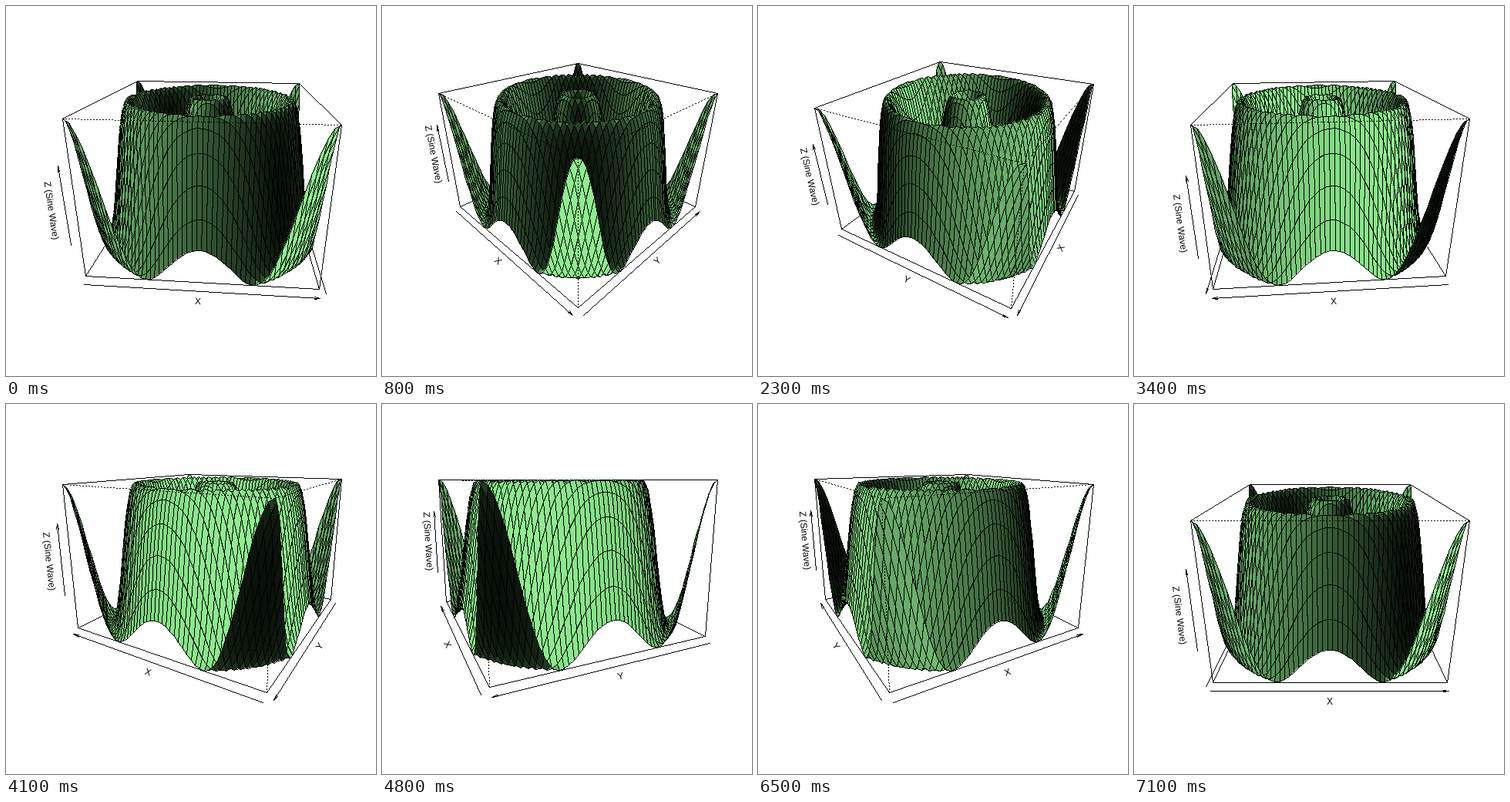
An HTML page with a canvas that plays this animation: 480x480 px, repeating every 7.2 s.

```html
<!DOCTYPE html>
<html lang="en">
<head>
<meta charset="utf-8">
<title>Rotating sine surface</title>
<style>
html, body { margin: 0; width: 100%; height: 100%; overflow: hidden; background: #fff; }
canvas { display: block; width: 480px; height: 480px; }
</style>
</head>
<body>
<canvas id="stage" width="480" height="480"></canvas>
<script>
const SIZE = 480, GRID = 50, EXPAND = 0.7, DIST = Math.sqrt(3) + 2;
const STEPS = 72, STEP_MS = 100, TICK = 0.06, SHADE = 0.5;
const PLOT = { cx: 254.4, cy: 232.8, w: 390.72 / 1.08, h: 347.52 / 1.08 };
const BLACK = 0xff000000;
const SIGNS = [-1, 1];
const LABELS = ['X', 'Y', 'Z (Sine Wave)'];

const ctx = document.getElementById('stage').getContext('2d', { willReadFrequently: true });
let pixels;

// Surface z = sin(r) over [-10, 10]², scaled to the unit box
const unit = i => 2 * i / (GRID - 1) - 1;
const height = (i, j) => Math.sin(10 * Math.hypot(unit(i), unit(j)));

// Facet colours under a fixed light from (-1, 1, 0)
function facetColor(i, j) {
  const u = EXPAND * (height(i + 1, j) - height(i, j + 1));
  const v = EXPAND * (height(i + 1, j + 1) - height(i, j));
  const len = Math.hypot(u + v, u - v, 4 / (GRID - 1));
  const shade = Math.pow(0.5 * (Math.SQRT2 * u / len + 1), SHADE);
  const g = shade * 238 | 0, rb = shade * 144 | 0;
  return (BLACK | rb << 16 | g << 8 | rb) >>> 0;
}

const points = [], facets = [];
for (let j = 0; j < GRID; j++) {
  for (let i = 0; i < GRID; i++) {
    points.push([unit(i), unit(j), height(i, j)]);
    if (i < GRID - 1 && j < GRID - 1) {
      const k = i + j * GRID;
      facets.push({ idx: [k, k + 1, k + 1 + GRID, k + GRID], color: facetColor(i, j), depth: 0 });
    }
  }
}

const corners = [];
for (const z of SIGNS) for (const y of SIGNS) for (const x of SIGNS) corners.push([x, y, z]);

function makeView(theta, phi) {
  const ct = Math.cos(theta), st = Math.sin(theta);
  const cp = Math.cos(phi), sp = Math.sin(phi);
  const raw = ([x, y, z]) => {
    const near = x * st - y * ct, up = z * EXPAND;
    const d = DIST - up * sp - near * cp;
    return [(x * ct + y * st) / d, (up * cp - near * sp) / d, d];
  };
  const box = corners.map(raw);
  const xs = box.map(p => p[0]), ys = box.map(p => p[1]);
  const x0 = Math.min(...xs), x1 = Math.max(...xs);
  const y0 = Math.min(...ys), y1 = Math.max(...ys);
  const k = Math.min(PLOT.w / (x1 - x0), PLOT.h / (y1 - y0));
  return {
    project(p) {
      const [x, y, d] = raw(p);
      return [PLOT.cx + k * (x - (x0 + x1) / 2), PLOT.cy - k * (y - (y0 + y1) / 2), d];
    },
    eye: [DIST * cp * st, -DIST * cp * ct, DIST * sp / EXPAND],
    base: box.slice(0, 4)
  };
}

// Hard-edged drawing on the pixel buffer
function line(a, b, dotted) {
  let x = Math.floor(a[0]), y = Math.floor(a[1]);
  const xe = Math.floor(b[0]), ye = Math.floor(b[1]);
  const dx = Math.abs(xe - x), dy = -Math.abs(ye - y);
  const sx = x < xe ? 1 : -1, sy = y < ye ? 1 : -1;
  let err = dx + dy;
  for (let n = 0; ; n++) {
    if (!dotted || n % 4 < 2) pixels[y * SIZE + x] = BLACK;
    if (x === xe && y === ye) return;
    const e2 = 2 * err;
    if (e2 >= dy) { err += dy; x += sx; }
    if (e2 <= dx) { err += dx; y += sy; }
  }
}

function polygon(pts, color) {
  const ys = pts.map(p => p[1]);
  const bottom = Math.max(...ys);
  for (let y = Math.min(...ys); y < bottom; y++) {
    const cuts = [], yc = y + 0.5;
    pts.forEach((a, n) => {
      const b = pts[(n + 1) % pts.length];
      if (a[1] < yc !== b[1] < yc) cuts.push(a[0] + (yc - a[1]) * (b[0] - a[0]) / (b[1] - a[1]));
    });
    cuts.sort((p, q) => p - q);
    for (let n = 0; n < cuts.length; n += 2) {
      pixels.fill(color, y * SIZE + Math.ceil(cuts[n] - 0.5), y * SIZE + Math.ceil(cuts[n + 1] - 0.5));
    }
  }
  pts.forEach((a, n) => line(a, pts[(n + 1) % pts.length]));
}

function arrow(a, b) {
  line(a, b);
  const back = Math.atan2(a[1] - b[1], a[0] - b[0]);
  for (const s of SIGNS) {
    const t = back + s * Math.PI / 18;
    line([b[0] + 7.2 * Math.cos(t), b[1] + 7.2 * Math.sin(t)], b);
  }
}

// Box edges between two faces turned to the eye are dotted and lie on top
function drawBox(view, front) {
  for (let axis = 0; axis < 3; axis++) {
    const p = (axis + 1) % 3, q = (axis + 2) % 3;
    for (const s of SIGNS) for (const t of SIGNS) {
      const near = view.eye[p] * s > 1 && view.eye[q] * t > 1;
      if (near !== front) continue;
      const a = [], b = [];
      a[axis] = -1; b[axis] = 1;
      a[p] = b[p] = s;
      a[q] = b[q] = t;
      line(view.project(a), view.project(b), front);
    }
  }
}

// Pick the axes beside the lowest and the leftmost base corner
function pickAxes(view) {
  const first = n => view.base.reduce((m, p, i) => p[n] < view.base[m][n] ? i : m, 0);
  const low = corners[first(1)], left = corners[first(0)];
  return [
    { axis: 0, dir: [0, low[1], -1], half: 1 },
    { axis: 1, dir: [low[0], 0, -1], half: 1 },
    { axis: 2, dir: [left[0], left[1], 0], half: 0.5 }
  ].map(({ axis, dir, half }) => {
    const at = (t, ticks) => {
      const p = dir.map(d => d * (1 + TICK * ticks));
      p[axis] = t;
      return view.project(p);
    };
    return { text: LABELS[axis], a: at(-half, 1), b: at(half, 1),
             p: at(-half, 0), q: at(half, 0), mid: at(0, 2) };
  });
}

function drawLabel({ text, p, q, mid }) {
  const [l, r] = p[0] < q[0] ? [p, q] : [q, p];
  ctx.save();
  ctx.translate(Math.floor(mid[0]), Math.floor(mid[1]));
  ctx.rotate(Math.atan2(r[1] - l[1], r[0] - l[0]));
  ctx.fillText(text, 0, 6);
  ctx.restore();
}

function drawSurface(view) {
  const proj = points.map(p => {
    const [x, y, d] = view.project(p);
    return [Math.floor(x), Math.floor(y), d];
  });
  for (const f of facets) f.depth = Math.max(...f.idx.map(k => proj[k][2]));
  const order = facets.slice().sort((a, b) => b.depth - a.depth);
  for (const f of order) polygon(f.idx.map(k => proj[k]), f.color);
}

function draw(step) {
  const theta = (step + 1) * 5 * Math.PI / 180;
  const view = makeView(theta, (20 + 10 * Math.sin(theta)) * Math.PI / 180);
  const axes = pickAxes(view);

  ctx.fillStyle = '#fff';
  ctx.fillRect(0, 0, SIZE, SIZE);
  ctx.fillStyle = '#000';
  ctx.font = '12px "Liberation Sans", Arial, sans-serif';
  ctx.textAlign = 'center';
  axes.forEach(drawLabel);

  const image = ctx.getImageData(0, 0, SIZE, SIZE);
  pixels = new Uint32Array(image.data.buffer);
  drawBox(view, false);
  for (const { a, b } of axes) arrow(a, b);
  drawSurface(view);
  drawBox(view, true);
  ctx.putImageData(image, 0, 0);
}

let shown = -1;
const start = performance.now();
function tick() {
  const step = Math.floor((performance.now() - start) / STEP_MS) % STEPS;
  if (step !== shown) draw(shown = step);
  requestAnimationFrame(tick);
}
tick();
</script>
</body>
</html>
```
